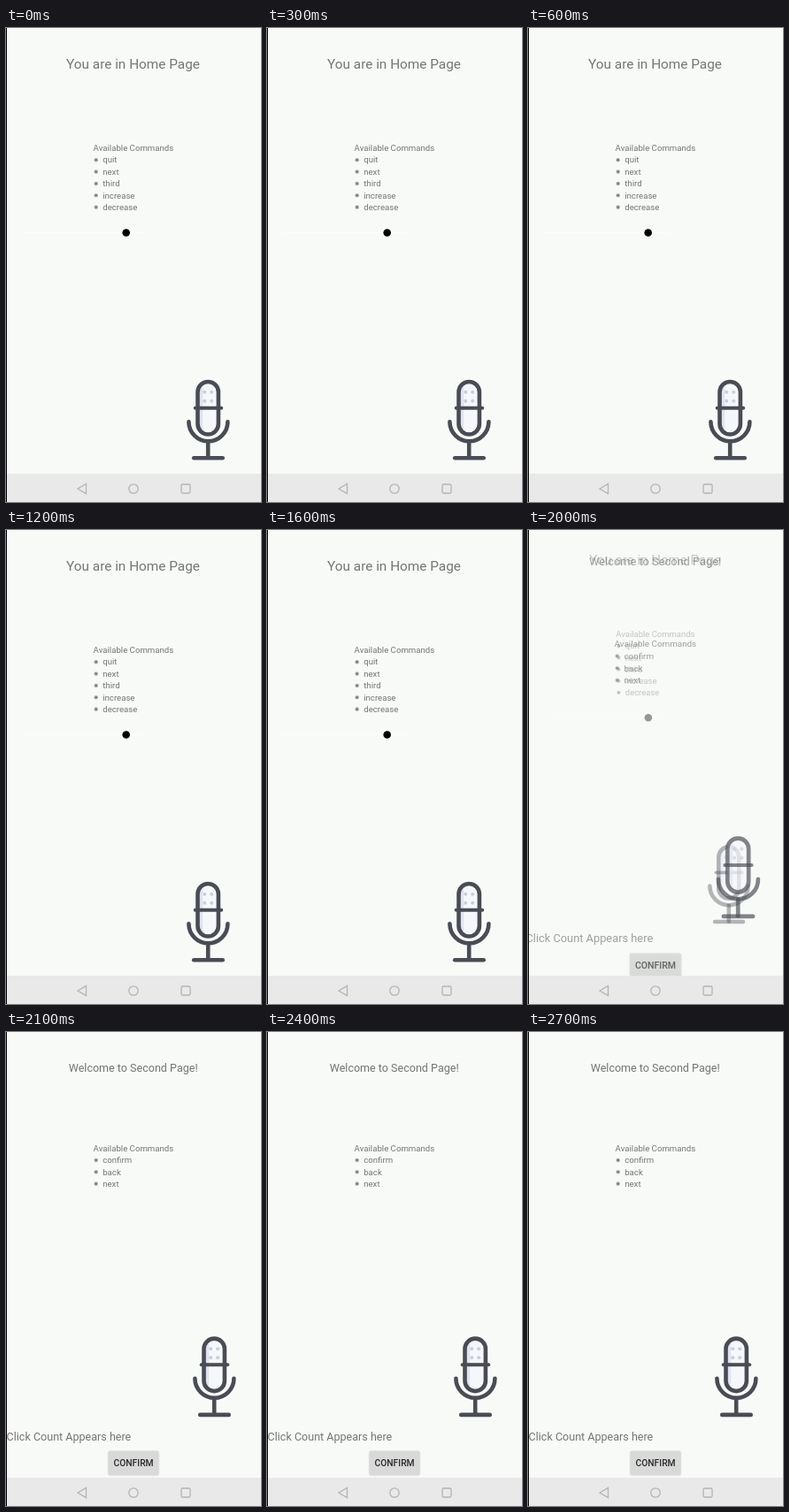
Write an HTML page with a canvas that moves like this. It is 288 px wide and 536 px high and loops after 2.8 s.

```html
<!DOCTYPE html>
<html lang="en">
<head>
<meta charset="utf-8">
<title>Voice commands</title>
<style>
html, body { margin: 0; width: 100%; height: 100%; overflow: hidden; background: #f8faf8; }
canvas { display: block; }
</style>
</head>
<body>
<canvas id="stage" width="288" height="536"></canvas>
<script>
const c = document.getElementById('stage').getContext('2d');
const LOOP = 2800, INK = '#4a4c55', GREY = '#747574';
const CENTER = { x: 144, y: 252 };

function text(str, x, y, size, align = 'left', color = GREY, weight = 400) {
  c.font = `${weight} ${size}px Roboto, sans-serif`;
  c.textAlign = align;
  c.fillStyle = color;
  c.fillText(str, x, y);
}

function disc(x, y, r, color) {
  c.fillStyle = color;
  c.beginPath();
  c.arc(x, y, r, 0, 7);
  c.fill();
}

function line(x1, y1, x2, y2) {
  c.beginPath();
  c.moveTo(x1, y1);
  c.lineTo(x2, y2);
  c.stroke();
}

function commands(y, names) {
  text('Available Commands', 98.6, y, 9.63);
  names.forEach((name, i) => {
    const row = y + 13.35 * (i + 1);
    disc(101.7, row - 3.2, 2.3, '#b4b5b4');
    disc(101.7, row - 3.2, 1.4, '#7c7d7c');
    text(name, 109.2, row, 9.63);
  });
}

// x is the stem's axis, y the top of the capsule
function mic(x, y) {
  const capsule = new Path2D();
  capsule.roundRect(-11.7, 2.3, 23.4, 59.5, 11.7);
  c.save();
  c.translate(x, y);
  c.lineCap = 'round';
  c.strokeStyle = INK;
  c.fillStyle = '#f6f7fb';
  c.fill(capsule);
  c.save();
  c.clip(capsule);
  c.fillStyle = '#e1e4ef';
  c.fillRect(-12, 0, 6, 64);
  c.restore();
  for (const [dx, dy] of [[-4, 14], [4, 14], [-4, 24], [4, 24]]) disc(dx, dy, 2, '#c9cede');
  c.lineWidth = 4.6;
  c.stroke(capsule);
  c.lineWidth = 4;
  line(-14.5, 32, 15, 32);
  c.lineWidth = 4.6;
  c.beginPath();
  c.arc(0.2, 47.5, 22, 0, Math.PI);
  c.stroke();
  line(0, 70, 0, 88);
  line(-16, 88.6, 16.5, 88.6);
  c.restore();
}

function home(squeeze) {
  const listShift = -20 * squeeze;
  text('You are in Home Page', 143.5, 45.8 - 10 * squeeze, 15.35, 'center');
  commands(139.1 + listShift, ['quit', 'next', 'third', 'increase', 'decrease']);
  c.fillStyle = '#fcfcfb';
  c.fillRect(18, 230.5 + listShift, 140, 2);
  disc(135.7, 231.5 + listShift, 4.3, '#000');
  mic(228.2, 397.7 - 40 * squeeze);
}

function second() {
  text('Welcome to Second Page!', 143.7, 44.6, 12.55, 'center');
  commands(134.8, ['confirm', 'back', 'next']);
  mic(235.2, 344.3);
  text('Click Count Appears here', 0.6, 461.6, 12.55);
  c.save();
  c.shadowColor = 'rgba(0,0,0,.15)';
  c.shadowBlur = 2;
  c.shadowOffsetY = 1;
  c.fillStyle = '#d8d9d8';
  c.beginPath();
  c.roundRect(115.5, 473.5, 57, 27, 1.5);
  c.fill();
  c.restore();
  text('CONFIRM', 144, 490.6, 10.3, 'center', '#2b2b2b', 500);
}

function page(draw, alpha, scale) {
  c.save();
  c.globalAlpha = alpha;
  c.translate(CENTER.x, CENTER.y);
  c.scale(scale, scale);
  c.translate(-CENTER.x, -CENTER.y);
  draw();
  c.restore();
}

function frame() {
  c.fillStyle = '#e9e9e9';
  c.fillRect(0, 504, 288, 32);
  c.strokeStyle = '#b3b4b3';
  c.lineWidth = 1.3;
  c.beginPath();
  c.moveTo(81, 521);
  c.lineTo(90.5, 515.5);
  c.lineTo(90.5, 526.5);
  c.closePath();
  c.stroke();
  c.beginPath();
  c.arc(144, 521, 5.2, 0, 7);
  c.stroke();
  c.beginPath();
  c.roundRect(198, 516, 10, 10, 1.5);
  c.stroke();
  c.fillStyle = '#000';
  c.fillRect(0, 0, 1, 536);
}

function render() {
  const t = performance.now() % LOOP;
  c.fillStyle = '#f8faf8';
  c.fillRect(0, 0, 288, 536);
  if (t < 1900) home(0);
  else if (t < 2000) home(1);
  else if (t < 2100) {
    page(() => home(1), 0.4, 0.983);
    page(second, 0.68, 1.022);
  } else second();
  frame();
  requestAnimationFrame(render);
}
render();
</script>
</body>
</html>
```
